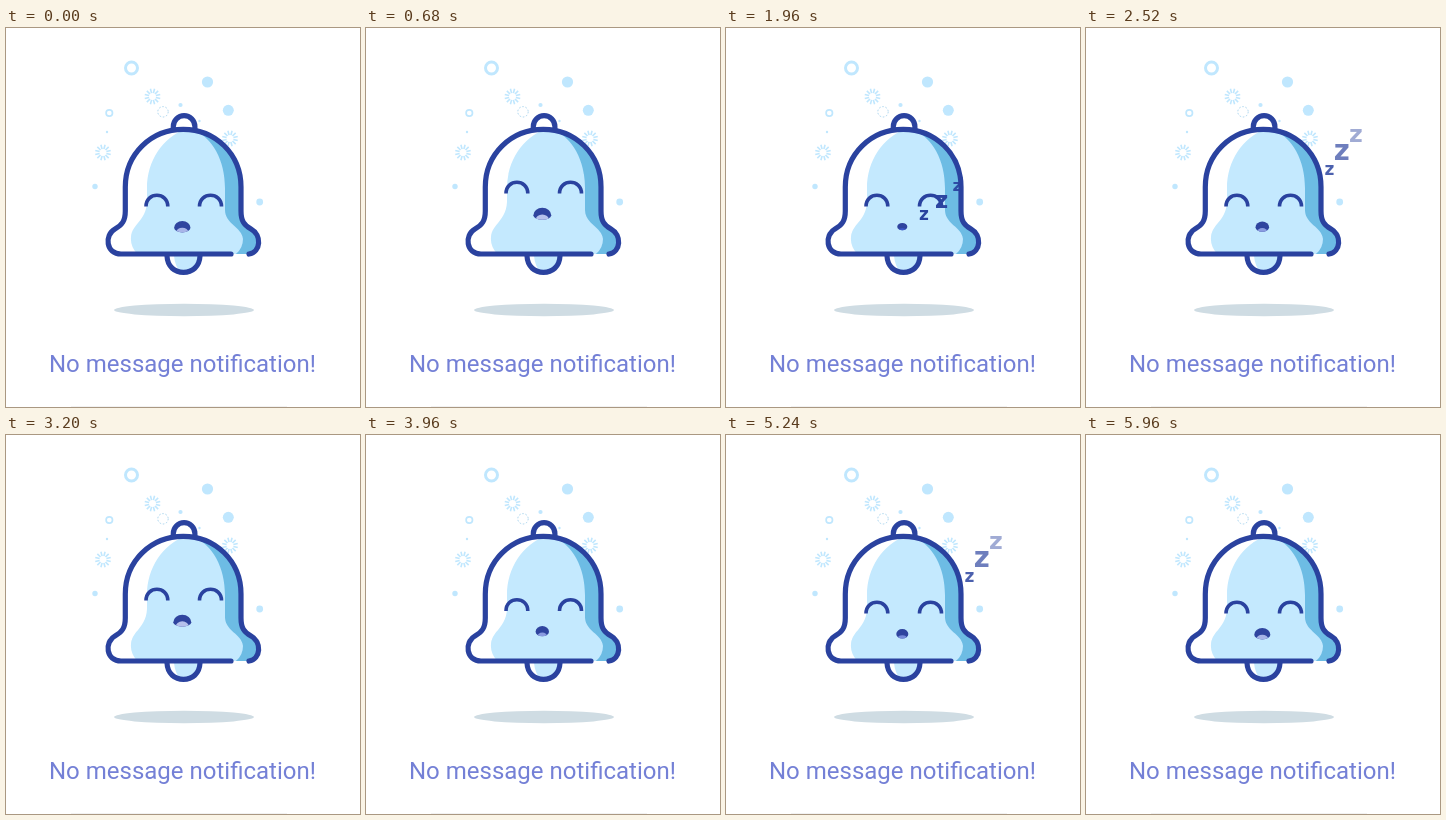
Recreate the animation shown at these times as an HTML page. Size 354x379 px, loop 6 s.

```html
<!DOCTYPE html>
<html lang="en">
<head>
<meta charset="utf-8">
<title>No message notification</title>
<style>
html, body { margin: 0; width: 100%; height: 100%; overflow: hidden; background: #fff; }
svg { display: block; width: 354px; height: 379px; font-family: Roboto, sans-serif; }
.sky { fill: #c0e7fe; }
.ring { fill: none; stroke: #c0e7fe; }
.line { fill: none; stroke: #2a429f; stroke-width: 5.2; stroke-linecap: round; stroke-linejoin: round; }
.eye { fill: none; stroke: #2a429f; stroke-width: 3.6; }
.z { fill: #2a429f; font: bold 10px "DejaVu Sans", sans-serif; text-anchor: middle; }
</style>
</head>
<body>
<svg viewBox="0 0 354 379">
  <defs>
    <path id="bell" d="M225 226H115C100 226 98 207 109 201C116 197 119.300 193 119.300 183V159C119.300 126 145 101.300 177.200 101.300S235 126 235 159V183C235 193 238 197 245 201C256 207 255 224 243 226"/>
    <clipPath id="inBell"><use href="#bell"/></clipPath>
    <clipPath id="inMouth"><path id="lips"/></clipPath>
    <path id="drift" d="M178 197C200 188 226 170 243 143S270 106 290 88"/>
  </defs>

  <g id="bits">
    <circle class="ring" cx="125.500" cy="40" r="6" stroke-width="3"/>
    <circle class="ring" cx="103.300" cy="85" r="3.200" stroke-width="1.700"/>
    <circle class="ring" cx="157" cy="83.800" r="5.200" stroke-dasharray="1.600 1.700" style="stroke:#a9d5ef"/>
  </g>

  <ellipse cx="178" cy="282" rx="70" ry="6.200" fill="#cfdce3"/>

  <path d="M168 228Q169 239 175 244A16 16 0 0 0 194 228Z" fill="#c4e9fe"/>
  <path class="line" d="M161 228C161.500 239 169 244.300 177.500 244.300S193.500 239 194 228"/>
  <path class="line" d="M167.300 101V98.500A10.800 10.800 0 0 1 188.900 98.500V101" style="fill:#fff"/>

  <use href="#bell" fill="#fff"/>
  <g clip-path="url(#inBell)">
    <path d="M183 100H260V230H232L180 160Z" fill="#6dbce4"/>
    <path d="M183 100C158 107 141 132 141 160V174C140 193 126 196 125 209Q124 219 133 228H227Q237 222 237 211C236 199 219 196 219 182V160C219 132 206 107 183 100Z" fill="#c4e9fe"/>
  </g>
  <use href="#bell" class="line"/>

  <g id="face">
    <path class="eye" d="M140 178.500C140 163.500 161.800 163.500 161.800 178.500M193.500 178.500C193.500 163.500 215.500 163.500 215.500 178.500"/>
    <use href="#lips" fill="#2f449f"/>
    <ellipse id="tongue" cx="176.300" clip-path="url(#inMouth)"/>
  </g>

  <g id="sleep"></g>

  <text x="43" y="344" font-size="24" fill="#7480d6">No message notification!</text>
  <path d="M65 378.500H281" stroke="#f2f2f2"/>
</svg>
<script>
const LOOP = 6000, SPEED = 0.115, X_HEIGHT = 0.547;
const $ = id => document.getElementById(id);
const set = (el, attrs) => { for (const k in attrs) el.setAttribute(k, attrs[k]); };

function add(parent, tag, attrs) {
  const el = document.createElementNS('http://www.w3.org/2000/svg', tag);
  set(el, attrs);
  return parent.appendChild(el);
}

// Background dots: x, y, radius
for (const [cx, cy, r] of [[201.5, 54, 5.6], [222.3, 82.3, 5.5], [174.5, 77, 2.1], [193.5, 93, 1.2],
  [101, 104, 1.2], [89, 158.5, 2.7], [253.7, 174, 3.4]])
  add($('bits'), 'circle', { class: 'sky', cx, cy, r });

// Bursts of twelve short rays
for (const [x, y] of [[146.5, 68.5], [97, 124.5], [224, 110.5]])
  for (let a = 15; a < 375; a += 30)
    add($('bits'), 'path', { class: 'ring', 'stroke-width': 1.6, d: 'M3.5 0H8', transform: `translate(${x} ${y}) rotate(${a})` });

// Sleep letters, in order of leaving: starting height and growth per pixel travelled
const letters = [[5, 0.061], [10.6, 0.041], [9.3, 0]].map(([size, grow], i) => {
  const el = add($('sleep'), 'text', { class: 'z' });
  el.textContent = 'z';
  return { el, size, grow, delay: i * 191 };
});
const drift = $('drift'), reach = drift.getTotalLength();

const smooth = u => { u = Math.min(1, Math.max(0, u)); return u * u * (3 - 2 * u); };

// The face rises with a breath, holds briefly and sinks back
const breath = (t, sink) => smooth(t / 600) - smooth((t - 650) / sink);

// The mouth swings between wide open and nearly shut at these times
const turns = [600, 1910, 3230, 4560, 6600];
function openness(t) {
  if (t < turns[0]) t += LOOP;
  const i = turns.findIndex(end => end > t);
  const u = smooth((t - turns[i - 1]) / (turns[i] - turns[i - 1]));
  return i % 2 ? 1 - u : u;
}

function drawMouth(open) {
  const w = 10 + 8 * open, h = 7 + 5 * Math.sqrt(open);
  const top = h * (0.5 + 0.12 * open), bottom = h - top, y = 198.7 - h / 2 + top;
  set($('lips'), { d: `M${176.3 - w / 2} ${y}a${w / 2} ${top} 0 0 1 ${w} 0a${w / 2} ${bottom} 0 0 1 ${-w} 0` });
  set($('tongue'), {
    cy: y + bottom, rx: w * 0.37, ry: h * (0.3 + 0.15 * open),
    fill: `hsl(228 58% ${50 + 32 * Math.sqrt(open)}%)`
  });
}

function drawLetters(age) {
  for (const { el, size, grow, delay } of letters) {
    const s = (age - delay) * SPEED;
    const shown = s > 0 && s < reach;
    set(el, { opacity: shown ? Math.min(s / 10, 1 - (s / reach) ** 3) : 0 });
    if (!shown) continue;
    const p = drift.getPointAtLength(s), tall = size + grow * s;
    set(el, { x: p.x, y: p.y + tall / 2 });
    el.style.fontSize = tall / X_HEIGHT + 'px';
  }
}

function draw(t) {
  const lift = breath(t, 750) + breath(t - 2600, 990);
  set($('face'), { transform: `translate(0 ${-13 * lift})` });
  drawMouth(openness(t));
  drawLetters(t < 3500 ? t - 1385 : t - 4105);
}

const start = performance.now();
function tick() {
  draw((performance.now() - start) % LOOP);
  requestAnimationFrame(tick);
}
tick();
</script>
</body>
</html>
```
